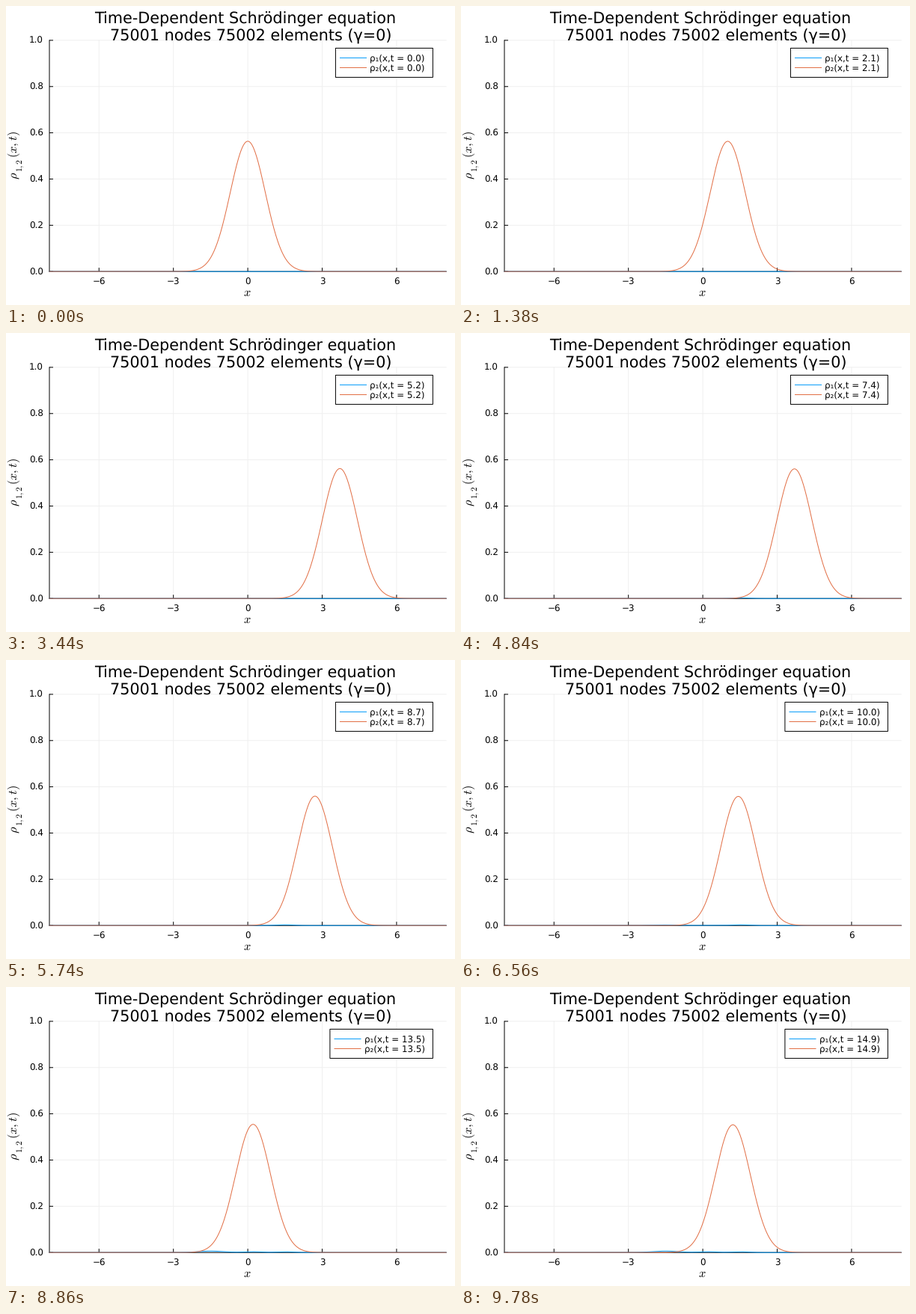
A matplotlib script for the animation above (9800 ms loop, 600 by 400 pixels).

```python
import numpy as np
import matplotlib.pyplot as plt
from matplotlib.animation import FuncAnimation
from matplotlib.patches import Rectangle

plt.rcParams.update({
    "font.family": "DejaVu Sans",
    "mathtext.fontset": "cm",
    "text.hinting": "none",
})

W, H, DPI = 600, 400, 100
PT = 72 / DPI                      # points per pixel
LEFT, RIGHT, TOP, BASE = 58, 588.2, 45.9, 355.2
BLUE, ORANGE = "#009AFA", "#E26F46"
TICK_MS, STEPS = 20, 150

# Steps come at 70 per second on a 10 ms clock; a 10 ms hold shows for 100 ms.
clock = np.round(np.arange(STEPS + 1) * 10 / 7)
holds = np.where(np.diff(clock) == 1, 5, 1)
holds[-1] = 1
schedule = np.repeat(np.arange(STEPS), holds)


def px(x):
    return LEFT + (np.asarray(x) + 8) / 16 * (RIGHT - LEFT)


def py(y):
    return BASE - np.asarray(y) * (BASE - TOP)


def bump(x, centre, width=1.0):
    return np.exp(-((x - centre) / width) ** 2)


def ease(t, start, end):
    u = np.clip((t - start) / (end - start), 0, 1)
    return u * u * (3 - 2 * u)


def rho1(x, t):
    """Small density that leaks into the other state."""
    return (0.0062 * ease(t, 8.5, 12) * bump(x, -1.5, 0.75)
            + 0.0033 * ease(t, 9, 13) * bump(x, 0.2, 0.5)
            + 0.0030 * ease(t, 4.5, 7.5) * bump(x, 1.5, 0.5))


def rho2(x, t):
    """Gaussian packet swinging in a harmonic well around x = 2."""
    return (0.5635 - 5e-5 * t * t) * bump(x, 2 * (1 - np.cos(t / 2)))


fig = plt.figure(figsize=(W / DPI, H / DPI), dpi=DPI, facecolor="white")
ax = fig.add_axes([0, 0, 1, 1])
ax.set_xlim(0, W)
ax.set_ylim(H, 0)
ax.axis("off")


def line(xs, ys, color="black", z=2, **kw):
    return ax.plot(xs, ys, color=color, lw=PT, zorder=z, snap=False, **kw)[0]


def label(x, y, s, size=11.9, ha="center", **kw):
    return ax.text(x, y, s, fontsize=size * PT, ha=ha, va="baseline",
                   zorder=7, **kw)


# Grid, ticks and axes
for v in range(-6, 7, 3):
    x = px(v)
    line([x, x], [TOP, BASE], "#f0f0f0", z=1)
    line([x, x], [BASE - 5, BASE], solid_capstyle="butt")
    label(x, 372.4, str(v).replace("-", "\u2212"))
for v in np.arange(6) / 5:
    y = py(v)
    line([LEFT, RIGHT], [y, y], "#f0f0f0", z=1)
    line([LEFT, LEFT + 5], [y, y], solid_capstyle="butt")
    label(50, y + 4.4, f"{v:.1f}", ha="right")
line([LEFT, LEFT], [TOP, BASE])
line([LEFT, RIGHT], [BASE, BASE])

# Titles
label(319.2, 24, "Time-Dependent Schrödinger equation", 20.8)
label(327.3, 46.4, "75001 nodes 75002 elements (γ=0)", 20.8)
label(322.6, 388, "$x$", 16.4)
for x, y, s, size in ((14.5, 232, r"$\rho$", 16.4),
                      (21.5, 222, "$1,2$", 11.5),
                      (14.5, 203, "$(x,t)$", 16.4)):
    label(x, y, s, size, ha="left", rotation=90, rotation_mode="anchor")

# Curves
grid = np.linspace(-8, 8, 1061)
curves = [(line(px(grid), py(0 * grid), color, z=z), rho)
          for color, z, rho in ((BLUE, 3, rho1), (ORANGE, 4, rho2))]

# Legend
BOX_X, KEY_X, TEXT_X = 440.4, 446, 486.2
box = ax.add_patch(Rectangle((BOX_X, 56.4), 130, 39, fc="white", ec="black",
                             lw=PT, zorder=5, snap=False))
rows = []
for name, y, color in (("ρ₁", 69.4, BLUE), ("ρ₂", 82.5, ORANGE)):
    key = line([KEY_X, KEY_X + 36], [y, y], color, z=6, solid_capstyle="butt")
    rows.append((name, key, label(TEXT_X, y + 3.9, "", ha="left")))


def update(i):
    t = schedule[i] / 10
    for curve, rho in curves:
        curve.set_ydata(py(rho(grid, t)))
    shift = 7.5 if t >= 10 else 0      # room for one more digit
    box.set_x(BOX_X - shift)
    box.set_width(130 + shift)
    for name, key, text in rows:
        key.set_xdata([KEY_X - shift, KEY_X + 36 - shift])
        text.set_x(TEXT_X - shift)
        text.set_text(f"{name}(x,t = {t:.1f})")
    return []


anim = FuncAnimation(fig, update, frames=len(schedule), interval=TICK_MS,
                     repeat=True, repeat_delay=0)
plt.show()
```
